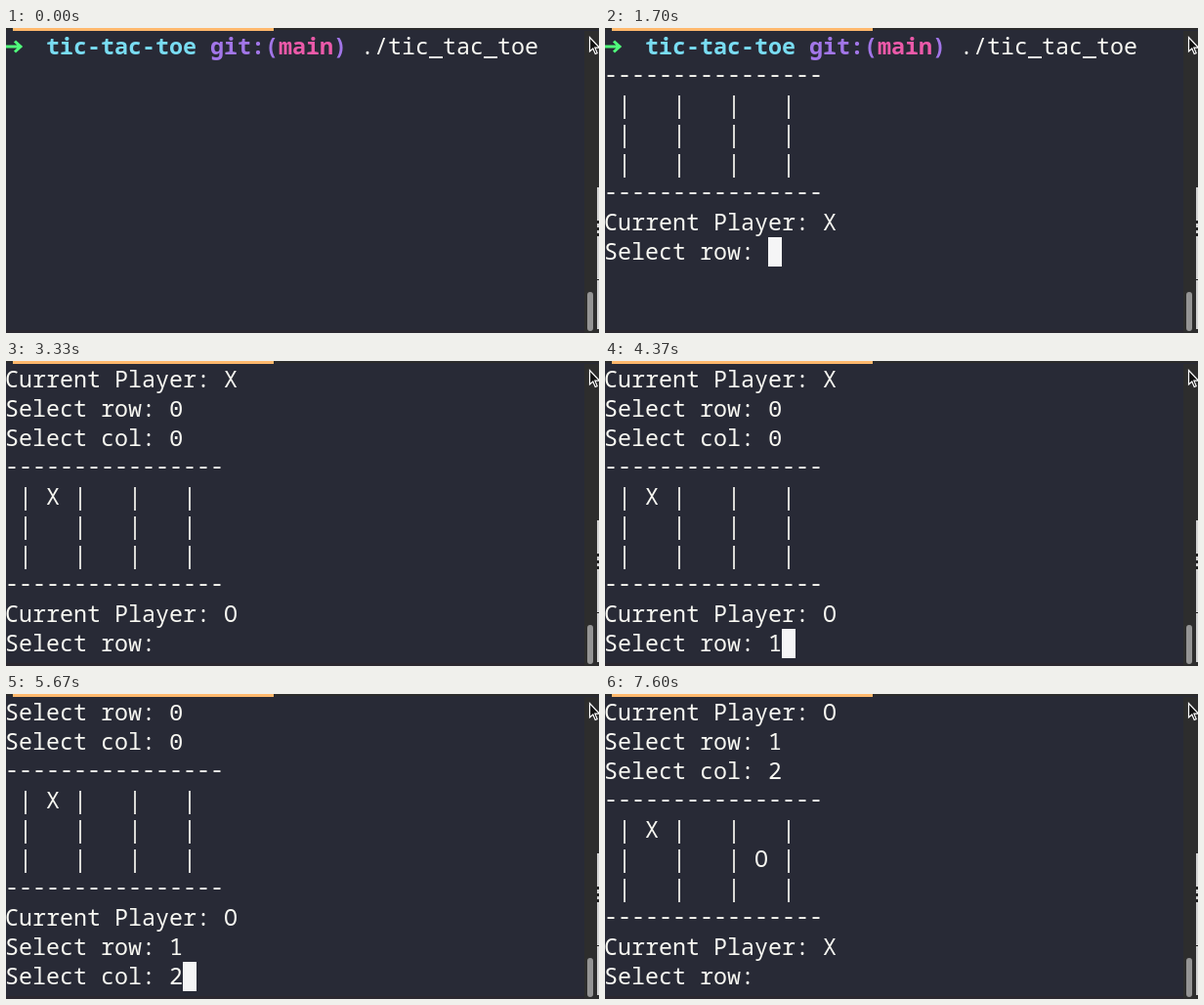
These frames come from a looping animation (607 by 312 pixels, 8 s). An HTML page:

```html
<!DOCTYPE html>
<html lang="en">
<head>
<meta charset="utf-8">
<title>Tic-tac-toe in a terminal</title>
<style>
  html, body { margin: 0; width: 100%; height: 100%; overflow: hidden; background: #282a36; }
  #stage { position: relative; width: 607px; height: 312px; overflow: hidden; background: #282a36; }
  #stage > * { position: absolute; }
  #topbar { left: 0; top: 0; width: 607px; height: 2px; background: #2b2b2b; }
  #tab { left: 7px; top: 0; width: 267px; height: 3px; background: #ffb86c; }
  #gutter { left: 592px; top: 3px; width: 15px; height: 309px; background: #2d2d2d; }
  #thumb { left: 595px; top: 270px; width: 6px; height: 40px; border-radius: 3px; background: #949494; }
  #bottom { left: 0; top: 309px; width: 592px; height: 3px; background: #2b2830; }
  #edge { left: 605px; top: 163px; width: 2px; height: 145px; background: #d4d4d4; }
  #edge i { position: absolute; left: 0; width: 2px; height: 3px; background: #222; }
  #pointer { left: 596px; top: 8px; }
  #screen { left: -1px; top: 3px; color: #f8f8f2; font: 23.333px/30px "Noto Sans Mono", monospace;
            font-variant-ligatures: none; white-space: pre; }
  #screen div { position: relative; height: 30px; }
  #screen .rule { top: -2.5px; }
  .zero { font: 24px/1 "Liberation Mono", monospace; }
  .dir { color: #79dcf2; }
  .git { color: #a276e8; }
  .branch { color: #ec5aa9; }
  .arrow { display: inline-block; width: 14px; height: 30px; vertical-align: top; overflow: visible; }
  #cursor { width: 14px; height: 30px; background: #f5f5f6; }
</style>
</head>
<body>
<div id="stage">
  <div id="topbar"></div>
  <div id="tab"></div>
  <div id="gutter"></div>
  <div id="bottom"></div>
  <div id="edge"><i style="top:34px"></i><i style="top:41px"></i><i style="top:47px"></i><i style="top:94px;height:1px"></i></div>
  <div id="thumb"></div>
  <div id="screen"></div>
  <div id="cursor"></div>
  <svg id="pointer" width="11" height="21" viewBox="0 0 11 21">
    <path d="M1.5 1.5V16L4.8 13L7.2 18.5L9.2 17.6L6.9 12.2H11.5Z" fill="#111" stroke="#fff" stroke-width="1.2"/>
  </svg>
</div>
<script>
  const LOOP = 8000, ROWS = 10, COL = 14, ROW = 30, TOP = 4;
  const RULE = '-'.repeat(16);

  const prompt = '<svg class="arrow" viewBox="0 0 14 30"><path d="M1 16H15M10 10.5L16 16L10 21.5" ' +
    'fill="none" stroke="#50fa7b" stroke-width="3"/></svg>' +
    '  <b class="dir">tic-tac-toe</b> <b class="git">git:(</b><b class="branch">main</b><b class="git">)</b> ./tic_tac_toe ';

  const board = rows => [RULE, ...rows.map(r => ' |' + [...r].map(c => ` ${c} |`).join('')), RULE];
  const turn = (rows, player) => [...board(rows), 'Current Player: ' + player];
  const ask = (what, value = '') => `Select ${what}: ${value}`;

  const first = [prompt, ...turn(['   ', '   ', '   '], 'X')];
  const second = [...first, ask('row', 0), ask('col', 0), ...turn(['X  ', '   ', '   '], 'O')];
  const third = [...second, ask('row', 1), ask('col', 2), ...turn(['X  ', '  O', '   '], 'X')];

  // Each step: start time, transcript, cursor column, times at which the cursor toggles
  const steps = [
    [0, [prompt], 40, [0, 30]],
    [470, [...first, ask('row')], 12, [1100, 1700]],
    [1830, [...first, ask('row', 0)], 13, []],
    [2070, [...first, ask('row', 0), ask('col')], 12, []],
    [2570, [...first, ask('row', 0), ask('col', 0)], 13, []],
    [2770, [...second, ask('row')], 12, [3330, 3930]],
    [4370, [...second, ask('row', 1)], 13, []],
    [4600, [...second, ask('row', 1), ask('col')], 12, [5200]],
    [5670, [...second, ask('row', 1), ask('col', 2)], 13, []],
    [5800, [...third, ask('row')], 12, [6400, 7000, 7600]]
  ];

  const screen = document.getElementById('screen');
  const cursor = document.getElementById('cursor');
  let shown = null;

  const lineHtml = line => line === RULE
    ? `<div class="rule">${line}</div>`
    : `<div>${line.replace(/: 0$/, ': <span class="zero">0</span>')}</div>`;

  function draw(now) {
    const t = now % LOOP;
    const step = steps.findLast(s => s[0] <= t);
    const [, lines, col, toggles] = step;
    if (step !== shown) {
      const visible = lines.slice(-ROWS);
      screen.innerHTML = visible.map(lineHtml).join('');
      cursor.style.left = col * COL - 1 + 'px';
      cursor.style.top = TOP + (visible.length - 1) * ROW + 'px';
      shown = step;
    }
    const on = toggles.filter(b => b <= t).length % 2 === 0;
    cursor.style.visibility = on ? 'visible' : 'hidden';
  }

  function tick() {
    draw(performance.now());
    requestAnimationFrame(tick);
  }
  tick();
</script>
</body>
</html>
```
